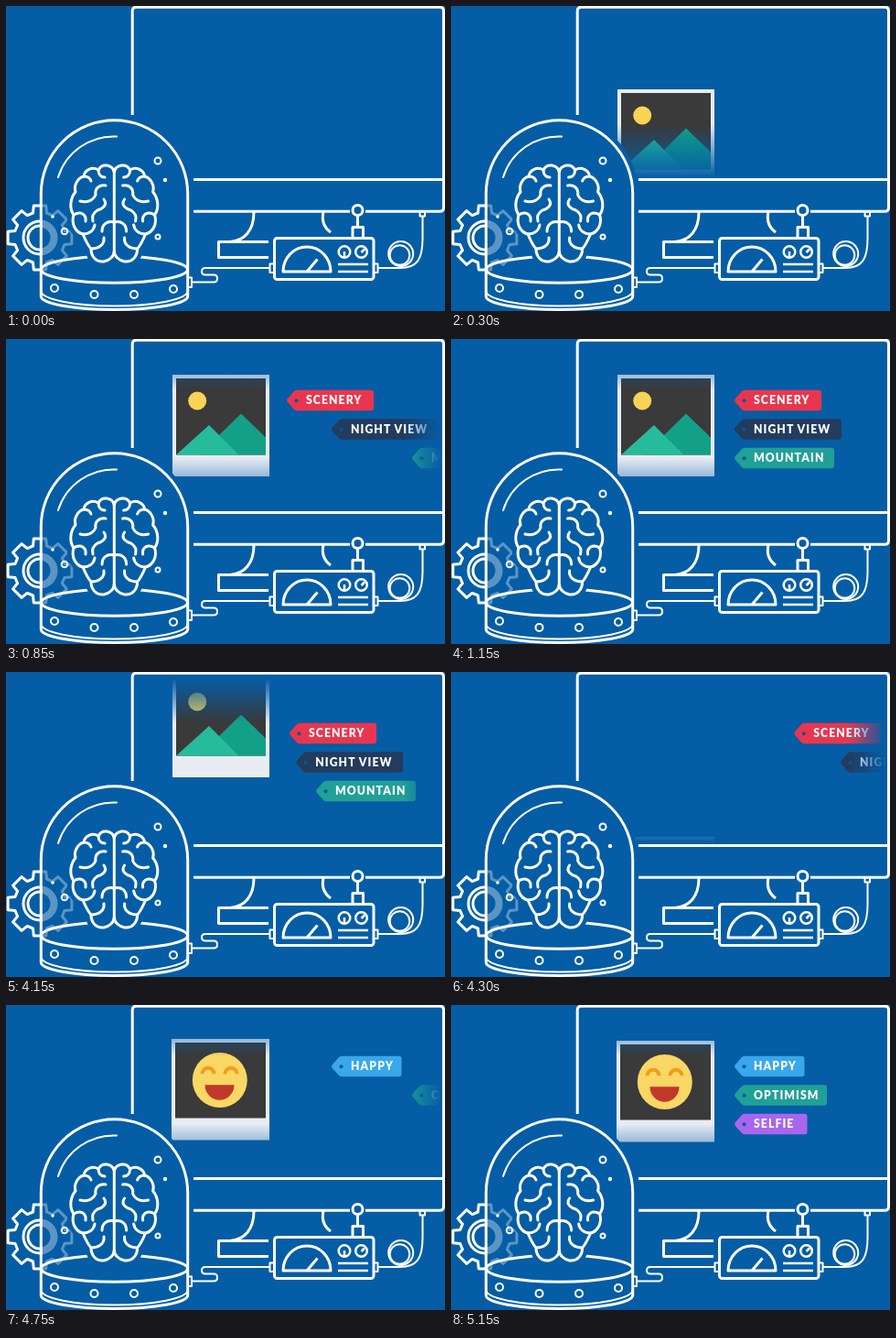
These frames come from a looping animation (480 px wide and 333 px high, 8 s). An HTML page:

```html
<!DOCTYPE html>
<html lang="en">
<head>
<meta charset="utf-8">
<title>Image tagging</title>
<style>
  html, body { margin: 0; width: 100%; height: 100%; overflow: hidden; background: #055da5; }
  svg { display: block; width: 100%; height: 100%; }
  .line { fill: none; stroke: #fff; stroke-width: 3; stroke-linejoin: round; }
  .mid { stroke-width: 2.5; }
  .thin { stroke-width: 2; }
  .round { stroke-linecap: round; }
  .halo { fill: #055da5; stroke: #055da5; stroke-width: 12; }
  .tag text { font: 900 12.2px Lato, "Open Sans", sans-serif; letter-spacing: 1.1px; fill: #fff; }
</style>
</head>
<body>
<svg viewBox="0 0 480 333" xmlns="http://www.w3.org/2000/svg">
  <defs>
    <linearGradient id="fadeY" gradientUnits="userSpaceOnUse" x1="0" y1="7" x2="0" y2="187">
      <stop offset="0" stop-color="#fff" stop-opacity="0"/>
      <stop offset=".27" stop-color="#fff"/>
      <stop offset=".68" stop-color="#fff"/>
      <stop offset="1" stop-color="#fff" stop-opacity="0"/>
    </linearGradient>
    <linearGradient id="fadeX" gradientUnits="userSpaceOnUse" x1="434" y1="0" x2="476" y2="0">
      <stop offset="0" stop-color="#fff"/>
      <stop offset="1" stop-color="#fff" stop-opacity="0"/>
    </linearGradient>
    <mask id="maskY" maskUnits="userSpaceOnUse" x="0" y="0" width="480" height="333">
      <rect y="7" width="480" height="180" fill="url(#fadeY)"/>
    </mask>
    <mask id="maskX" maskUnits="userSpaceOnUse" x="0" y="0" width="480" height="333">
      <rect width="476" height="333" fill="url(#fadeX)"/>
    </mask>
    <clipPath id="outside"><rect y="200" width="38.5" height="110"/></clipPath>
    <clipPath id="inside"><rect x="38.5" y="200" width="50" height="110"/></clipPath>
    <path id="shell" d="M38.300 317V205A80.200 80.200 0 0 1 198.700 205V317A80.200 14.500 0 0 1 38.300 317Z"/>
    <g id="gear" class="line">
      <path id="cog"/>
      <circle cx="37" cy="253" r="18"/>
      <circle cx="37" cy="253" r="13"/>
    </g>
    <path id="half" d="M118.300 181C116 173 105 171 101 179C94 175 86 179 85 186C78 188 74 196 76 203C70 210 69 221 74 228C71 238 76 247 84 249C87 256 90 262 93 265C93 274 99 280 107 279C113 278 118.300 273 118.300 268"/>
    <g id="folds">
      <path d="M109 196C101 195 97 200 98 206C95 213 88 215 81 213M101 179C101 184 104 187 108 187M85 186C89 186 92 188 93 191"/>
      <path d="M74 228C82 223 88 228 87 235M107 211C112 218 104 222 100 223C95 226 94 231 95 235M118.300 236C110 234 105 239 105 246"/>
      <path d="M84 249C91 249 96 245 97 239M93 265C102 265 108 260 107 253"/>
    </g>
  </defs>

  <!-- monitor and stand -->
  <g class="line">
    <path d="M138.200 119V5.500Q138.200 1.200 142.500 1.200H474.500Q478.500 1.200 478.500 5.500V220Q478.500 224.300 474.500 224.300H393M376 224.300H205M205 189.400H478.500"/>
    <path d="M271 225C271 245 261 256 245 257.500M347 225C345 234 348 242 355 247M287 257.500H232.500V274.500H287"/>
  </g>

  <g mask="url(#maskY)">
    <g id="photo0">
      <rect x="182" width="106" height="111" fill="#e9edf3"/>
      <rect x="186" y="4" width="98" height="83.500" fill="#3a3a3a"/>
      <circle cx="209.200" cy="28.500" r="10" fill="#f7d455"/>
      <path d="M211 87.500L257 42.500L284 68.500V87.500Z" fill="#12a187"/>
      <path d="M186 87.500L222 55L254.500 87.500Z" fill="#26bb9a"/>
    </g>
    <g id="photo1">
      <rect x="181" width="107" height="110.500" fill="#e9edf3"/>
      <rect x="185" y="4" width="99" height="82.500" fill="#3a3a3a"/>
      <circle cx="233.800" cy="45" r="30" fill="#f8d764"/>
      <path d="M214.500 38.300A6.500 6.500 0 0 1 227.500 38.300M239.500 38.300A6.500 6.500 0 0 1 252.500 38.300" fill="none" stroke="#f29c1f" stroke-width="4"/>
      <path d="M217.500 50.300H249.500A16 16.500 0 0 1 217.500 50.300Z" fill="#c0392b"/>
    </g>
  </g>
  <g id="tags" mask="url(#maskX)"></g>

  <!-- control box -->
  <g class="line">
    <circle cx="384.500" cy="223" r="5.500"/>
    <path d="M384.500 229V241M379 252V241.500H390.500V252"/>
    <rect x="293.500" y="253.500" width="108.500" height="45" rx="3"/>
    <path d="M303 290A26 27 0 0 1 355 290ZM329 290L340.500 276.500"/>
    <g class="mid">
      <circle cx="370" cy="268.500" r="6.300"/><circle cx="388.500" cy="268.500" r="6.300"/>
      <path d="M370 268V274M388.500 269L392 265.500M363 282H396M363 290H396"/>
    </g>
    <g class="thin">
      <path d="M293 281.500H288.500V291H293M402 281.500H406.500V291H402"/>
      <path d="M407 286H431C449 286 455.500 277 455.500 254V230"/>
      <rect x="452.500" y="224.500" width="5.500" height="5"/>
      <circle cx="431.700" cy="270.500" r="13.500"/><circle cx="430.500" cy="272" r="10.800"/>
    </g>
  </g>

  <!-- dome hides what slides behind it -->
  <use href="#shell" class="halo"/>
  <use href="#gear" clip-path="url(#outside)"/>
  <g clip-path="url(#inside)" opacity=".35">
    <use href="#gear"/>
    <circle cx="37" cy="253" r="15.500" class="line" style="stroke-width:5"/>
  </g>
  <g class="line">
    <use href="#shell"/>
    <ellipse cx="118.500" cy="287.800" rx="80" ry="14.500"/>
    <g class="thin">
      <path d="M38.300 311A80.200 16.500 0 0 0 198.700 311"/>
      <path class="round" d="M57 187A63.500 63.500 0 0 1 121 142.500"/>
      <circle cx="53" cy="308" r="4"/><circle cx="96.500" cy="315" r="4"/>
      <circle cx="140" cy="315" r="4"/><circle cx="183" cy="309" r="4"/>
      <circle cx="166" cy="169" r="3.500"/><circle cx="166" cy="252" r="2.500"/>
      <circle cx="64" cy="246" r="3.300"/>
      <path d="M203 301.500H227Q231 301.500 231 297.500T227 293.500H218Q214 293.500 214 289.800T218 286H288"/>
      <rect x="199" y="296.500" width="4" height="10.500"/>
    </g>
  </g>
  <g fill="#fff"><circle cx="174" cy="190" r="2.200"/><circle cx="51" cy="230" r="1.800"/></g>

  <!-- brain -->
  <g class="halo">
    <use href="#half"/><use href="#half" transform="translate(236.600) scale(-1 1)"/>
  </g>
  <g class="line round">
    <g id="lobe"><use href="#half"/><use href="#folds"/></g>
    <use href="#lobe" transform="translate(236.600) scale(-1 1)"/>
    <path d="M118.300 178V271"/>
  </g>
</svg>

<script>
const LOOP = 8000, STEP = 50, LEAVE = 4150, OFF = 520;
const $ = id => document.getElementById(id);
const SVG = 'http://www.w3.org/2000/svg';

// positions at 50 ms intervals
const rise = [190, 186, 180, 167, 147, 120, 91, 64, 44, 34.5, 35.3, 37, 38.4, 39];
const slide = [490, 472, 444, 401, 356, 323, 307, 306.5, 310];

const sets = [
  { photo: $('photo0'), start: 0, tagStart: 550, end: LEAVE, tags: [
    ['SCENERY', 95, '#e9364e'], ['NIGHT VIEW', 117, '#233c5d'], ['MOUNTAIN', 109, '#20a096']] },
  { photo: $('photo1'), start: 4200, tagStart: 4550, end: Infinity, tags: [
    ['HAPPY', 76.5, '#38a8ea'], ['OPTIMISM', 101, '#20a096'], ['SELFIE', 79.5, '#a866ee']] }
];

function makeTag([label, w, color]) {
  const g = document.createElementNS(SVG, 'g');
  g.setAttribute('class', 'tag');
  g.innerHTML = `<path fill="${color}" d="M.5 -1.5L8 -10Q9.500 -11.300 12 -11.300H${w - 3}Q${w} -11.300 ${w} -8.300V8.300Q${w} 11.300 ${w - 3} 11.300H12Q9.500 11.300 8 10L.5 1.5Q-.3 0 .5 -1.5Z"/>
    <circle cx="10.500" cy=".3" r="2" fill="#07569b"/><text x="21" y="4.100">${label}</text>`;
  $('tags').append(g);
  return g;
}

function drawCog() {
  const teeth = 8, pts = [];
  for (let i = 0; i < teeth; i++) {
    for (const [da, r] of [[-0.27, 28], [-0.19, 35.5], [0.19, 35.5], [0.27, 28]]) {
      const a = i * 2 * Math.PI / teeth + da;
      pts.push((37 + r * Math.cos(a)).toFixed(1) + ' ' + (253 + r * Math.sin(a)).toFixed(1));
    }
  }
  $('cog').setAttribute('d', 'M' + pts.join('L') + 'Z');
}

function at(table, ms) {
  const p = Math.max(0, Math.min(table.length - 1, ms / STEP));
  const i = Math.floor(p), next = table[Math.min(i + 1, table.length - 1)];
  return table[i] + (next - table[i]) * (p - i);
}

const move = (el, x, y) => el.setAttribute('transform', `translate(${x.toFixed(2)} ${y.toFixed(2)})`);

function render(t) {
  for (const s of sets) {
    const gone = t >= s.end;
    const y = gone ? 39 - 0.0035 * (t - s.end + 100) ** 2 : at(rise, t - s.start);
    move(s.photo, 0, y);
    s.nodes.forEach((tag, i) => {
      const x = gone
        ? Math.min(OFF, 310 + 0.0029 * (t - s.end + 50 * i) ** 2)
        : at(slide, t - s.tagStart - 100 * i);
      move(tag, x > 480 ? OFF : x, 67 + 31.5 * i);
    });
  }
}

function tick() {
  const t = performance.now() % LOOP;
  render(Math.floor(t / STEP) * STEP);
  requestAnimationFrame(tick);
}

drawCog();
for (const s of sets) s.nodes = s.tags.map(makeTag);
tick();
</script>
</body>
</html>
```
